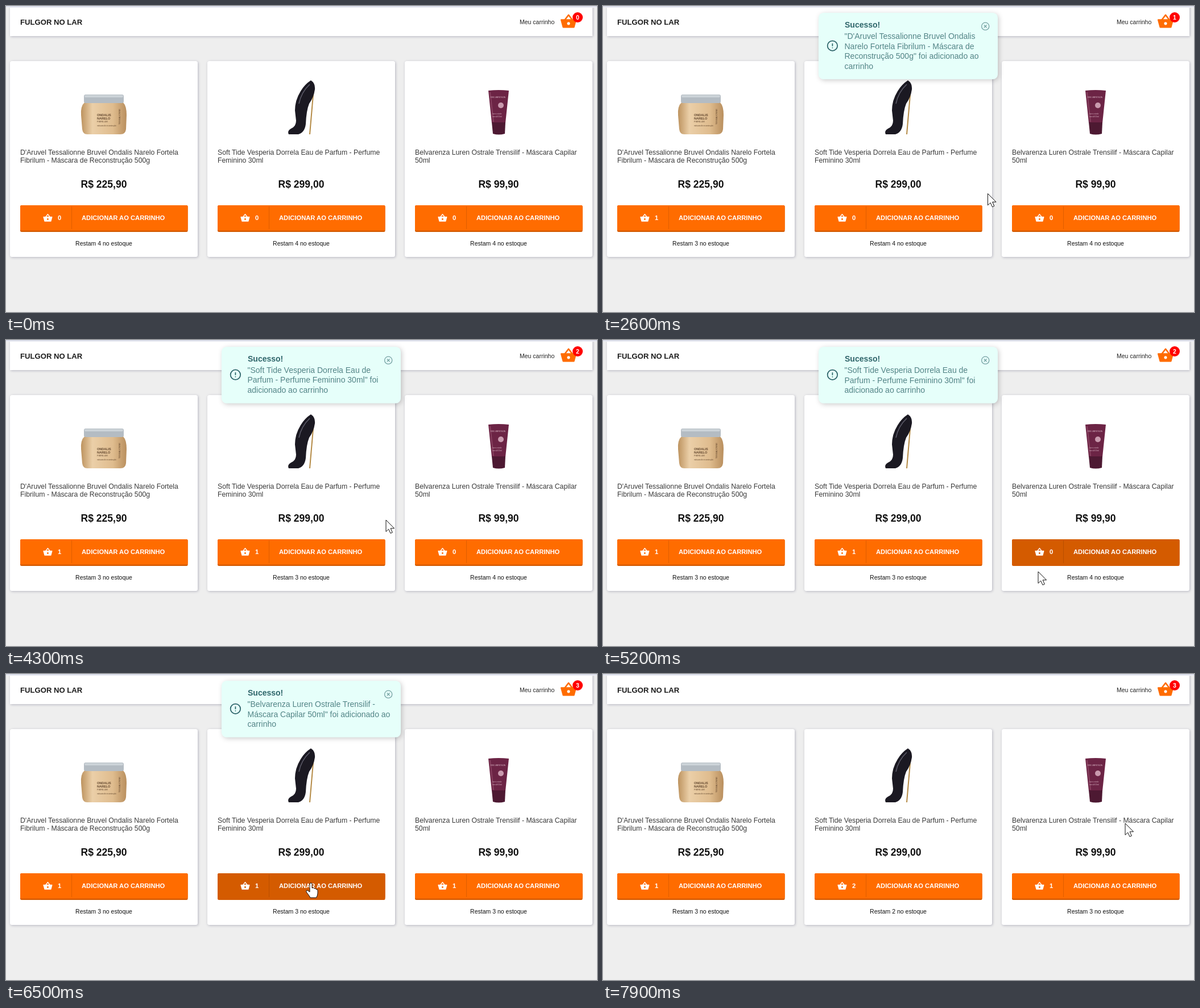
An HTML page that plays this animation: 1039x539 px, repeating every 8 s.

```html
<!DOCTYPE html>
<html lang="pt-BR">
<head>
<meta charset="utf-8">
<title>Carrinho</title>
<style>
  html, body { margin: 0; width: 100%; height: 100%; overflow: hidden; background: #eee; }
  svg { display: block; font-family: "Liberation Sans", Arial, sans-serif; }
  .panel { fill: #fff; filter: drop-shadow(1px 1px 2px rgba(30, 30, 70, .28)); }
  .toast { fill: #e6fffa; filter: drop-shadow(2px 2px 4px rgba(0, 0, 0, .2)); }
  .line { fill: none; stroke: #2e656a; stroke-linecap: round; }
  .middle { text-anchor: middle; }
  .bold { font-weight: bold; }
</style>
</head>
<body>
<svg id="stage" width="1039" height="539" viewBox="0 0 1039 539"></svg>
<script>
const LOOP = 8000, STEP = 100, PITCH = 347;
const BUTTON = { x: 25, y: 351, w: 294.6, h: 47 };
const stage = document.getElementById('stage');

const ARROW = 'M0 0V20.5L4.7 16.2L8 23.5L11.3 22L8.2 14.8H14.6Z';
const HAND = 'M-2 2Q-2 0 0 0T2 2V9Q5 7.5 6 10Q9 9 9.5 11.5Q12 11 12 13.5V18Q12 22 9.5 26H-1Q-3 22 -8 16Q-9 13 -6 13L-2 16Z';

const JAR = `
  <linearGradient id="gold"><stop stop-color="#bd935f"/><stop offset=".25" stop-color="#ebcfa8"/><stop offset=".7" stop-color="#dfbc8e"/><stop offset="1" stop-color="#b98f5e"/></linearGradient>
  <path d="M138 170Q131 176 132 192L134 217Q135 226 143 226H201Q210 226 211 217L212 192Q212 176 206 170Z" fill="url(#gold)"/>
  <rect x="137" y="156" width="70" height="15" rx="3" fill="#b4bcc3"/>
  <rect x="138" y="157" width="68" height="4" rx="2" fill="#ccd3d8"/>
  <g fill="#60452d"><text x="160" y="194" font-size="5.5" class="bold">ONDALIS</text>
  <text x="160" y="199.5" font-size="5.5" class="bold">NARELO</text>
  <text x="160" y="205" font-size="4">FIBRILUM</text>
  <text x="160" y="212" font-size="3">máscara de reconstrução</text>
  <text transform="translate(201 209)rotate(-90)" font-size="4">TESSALIONNE</text></g>`;
const SHOE = `
  <path d="M194 145L187 226" stroke="#b48a45" stroke-width="2"/>
  <path d="M189 131Q197 136 196 147Q194 161 186 172Q181 184 180 208Q178 223 167 226H150Q147 220 154 216Q163 212 163 202L161 184Q161 166 171 150Q178 138 189 131Z" fill="#1b1922"/>
  <path d="M187 138Q172 152 168 172" fill="none" stroke="#5e5d6b" stroke-width="1.5"/>`;
const TUBE = `
  <path d="M154 149Q172 147 190 149L184 206H160Z" fill="#6c2445"/>
  <path d="M157 152L163 204" stroke="#87405f" stroke-width="2"/>
  <path d="M160 205H184L183 225Q172 228 162 225Z" fill="#4d1932"/>
  <circle cx="176" cy="175" r="5" fill="#c99aae"/>
  <g fill="#d5b0c0"><text x="158" y="162" font-size="4">BELVARENZA</text>
  <text x="161" y="191" font-size="3">luren ostrale</text><text x="161" y="196" font-size="3">trensilif 50ml</text></g>`;

// adds: times when a unit enters the cart; drop: how far above its place the toast starts
const products = [
  { art: JAR, price: '225,90', adds: [1900], toast: { from: 2000, to: 4200, drop: 0 },
    title: ["D'Aruvel Tessalionne Bruvel Ondalis Narelo Fortela", 'Fibrilum - Máscara de Reconstrução 500g'],
    note: ['"D\'Aruvel Tessalionne Bruvel Ondalis', 'Narelo Fortela Fibrilum - Máscara de', 'Reconstrução 500g" foi adicionado ao', 'carrinho'] },
  { art: SHOE, price: '299,00', adds: [3300, 7100], toast: { from: 3400, to: 5800, drop: 60 },
    title: ['Soft Tide Vesperia Dorrela Eau de Parfum - Perfume', 'Feminino 30ml'],
    note: ['"Soft Tide Vesperia Dorrela Eau de', 'Parfum - Perfume Feminino 30ml" foi', 'adicionado ao carrinho'] },
  { art: TUBE, price: '99,90', adds: [5300], toast: { from: 5400, to: 7600, drop: 0 },
    title: ['Belvarenza Luren Ostrale Trensilif - Máscara Capilar', '50ml'],
    note: ['"Belvarenza Luren Ostrale Trensilif -', 'Máscara Capilar 50ml" foi adicionado ao', 'carrinho'] },
];

// Pointer moves: start, end, destination; it rests in between
const moves = [
  [100, 700, 222, 380], [800, 1000, 286, 332], [1000, 1500, 683, 325],
  [2500, 3000, 620, 377], [3200, 3500, 652, 322], [3500, 3800, 668, 317],
  [4400, 4900, 758, 387], [5000, 5200, 765, 408], [5200, 5500, 717, 428],
  [6000, 6500, 536, 368], [6500, 6700, 530, 370], [6800, 7200, 718, 286], [7600, 7900, 918, 263],
];

const smooth = u => u * u * (3 - 2 * u);
const clamp = u => Math.min(1, Math.max(0, u));

function pointerAt(t) {
  if (t < STEP) return null;
  let x = 777, y = 116;
  for (const [start, end, toX, toY] of moves) {
    const k = smooth(clamp((t - start) / (end - start)));
    x += (toX - x) * k;
    y += (toY - y) * k;
  }
  return [x, y];
}

function buttonAt(point) {
  if (!point || point[1] < BUTTON.y || point[1] > BUTTON.y + BUTTON.h) return -1;
  return products.findIndex((_, i) => {
    const dx = point[0] - BUTTON.x - PITCH * i;
    return dx >= 0 && dx <= BUTTON.w;
  });
}

const text = (x, y, size, value, extra = '') =>
  `<text x="${x}" y="${y}" font-size="${size}" ${extra}>${value}</text>`;
const count = (product, t) => product.adds.filter(time => t >= time).length;

const basket = (x, y, size, color, hole) => `
  <g transform="translate(${x} ${y})scale(${size / 24})" stroke="${color}" stroke-width="2" stroke-linejoin="round">
    <path d="M6.8 10L12 3.2L17.2 10" fill="none"/><path d="M2 10H22L19.3 20H4.7Z" fill="${color}"/>
    <circle cx="12" cy="15" r="2" fill="${hole}" stroke="none"/></g>`;

function card(product, i, t, hovered) {
  const n = count(product, t), face = hovered ? '#d45b00' : '#ff6c00';
  const { x, y, w, h } = BUTTON;
  return `<g transform="translate(${PITCH * i})">
    <rect class="panel" x="7" y="97" width="330" height="345" rx="3.5"/>
    ${product.art}
    ${product.title.map((line, k) => text(25, 262 + 14 * k, 12.25, line, 'fill="#3a3a3a"')).join('')}
    ${text(172, 320, 17.5, 'R$ ' + product.price, 'class="middle bold" fill="#111"')}
    <rect x="${x}" y="${y}" width="${w}" height="${h}" rx="2.5" fill="#d45b00"/>
    <rect x="${x}" y="${y}" width="${w}" height="${h - 2.5}" rx="2.5" fill="${face}"/>
    <path d="M115.5 353V393" stroke="#000" stroke-opacity=".12"/>
    ${basket(64.7, 364.5, 17.5, '#fff', face)}
    <g fill="#fff" class="bold">
      ${text(94, 376.5, 11.2, n, 'class="middle"')}${text(133, 376.5, 11.2, 'ADICIONAR AO CARRINHO')}
    </g>
    ${text(172, 422, 10.5, `Restam ${4 - n} no estoque`, 'class="middle" fill="#111"')}
  </g>`;
}

function toast({ note, toast: { from, to, drop } }, t) {
  if (t < from || t > to) return '';
  const height = 47 + 17.5 * note.length;
  const shift = t === to ? -50 : -drop * Math.exp((from - t) / 87);
  return `<g transform="translate(0 ${shift})" opacity="${1 + shift / 125}">
    <rect class="toast" x="379" y="12" width="315" height="${height}" rx="8.75"/>
    <g class="line" transform="translate(403.4 ${11.5 + height / 2})" stroke-width="1.75">
      <circle r="8.75"/><path d="M0 -3.5V0M0 3.5h.01"/></g>
    <g class="line" transform="translate(672.2 35.8)" stroke-width="1.3" opacity=".6">
      <circle r="6.6"/><path d="M-2 -2L2 2M2 -2L-2 2"/></g>
    <g fill="#2e656a">${text(425, 38, 14, 'Sucesso!', 'class="bold"')}
      <g opacity=".8">${note.map((line, k) => text(424.5, 58 + 17.5 * k, 14, line)).join('')}</g></g>
  </g>`;
}

function cursor(point) {
  if (!point) return '';
  const shape = buttonAt(point) < 0 ? ARROW : HAND;
  return `<path transform="translate(${point})" d="${shape}" fill="#fff" stroke="#111" stroke-linejoin="round"/>`;
}

function scene(t) {
  const hovered = buttonAt(pointerAt(t - STEP)); // hover style lags one step
  const inCart = products.filter(p => count(p, t)).length;
  return `<rect width="1039" height="539" fill="#eee"/>
    <rect class="panel" x="7" y="0" width="1024" height="53"/>
    ${text(25, 33, 13.125, 'FULGOR NO LAR', 'class="bold" fill="#1c1c1c"')}
    ${text(903, 32, 10.5, 'Meu carrinho', 'fill="#222"')}
    ${basket(973.7, 11.7, 30.6, '#ff6c00', '#fff')}
    <circle cx="1005" cy="20" r="9" fill="#f00"/>
    ${text(1005, 24, 10.5, inCart, 'class="middle bold" fill="#fff"')}
    ${products.map((p, i) => card(p, i, t, i === hovered)).join('')}
    ${products.map(p => toast(p, t)).join('')}
    <rect width="1039" height="3" fill="#eef0f5"/><rect width="1039" height="2" fill="#dcdeea"/>
    ${cursor(pointerAt(t))}`;
}

let shown = -1;
function tick() {
  const t = Math.floor(performance.now() % LOOP / STEP) * STEP;
  if (t !== shown) stage.innerHTML = scene(shown = t);
  requestAnimationFrame(tick);
}
tick();
</script>
</body>
</html>
```
